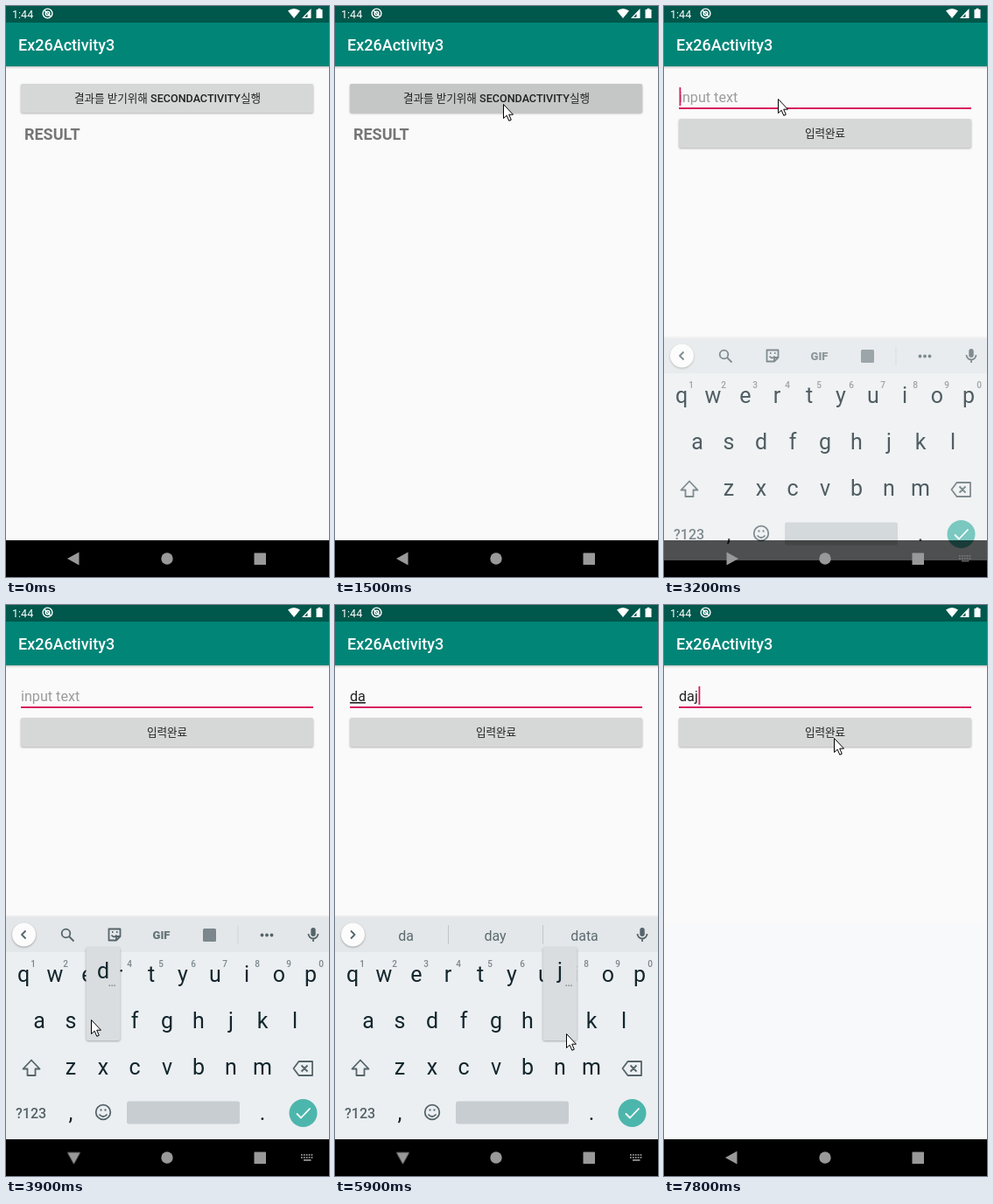
An HTML page that plays this animation: 369x653 px, repeating every 8 s.

```html
<!DOCTYPE html>
<html lang="ko">
<head>
<meta charset="utf-8">
<title>Ex26Activity3</title>
<style>
html, body { margin: 0; width: 100%; height: 100%; overflow: hidden; background: #000; }
svg { display: block; width: 369px; height: 653px; }
text { font-family: Roboto, "Noto Sans CJK KR", "Noto Sans CJK", sans-serif; }
.mid { text-anchor: middle; }
.title { font-size: 18px; font-weight: 500; fill: #fff; }
.label { font-size: 12.57px; font-weight: 500; fill: #222; text-anchor: middle; }
.ko { font-weight: 400; }
.result { font-size: 18px; font-weight: 700; fill: #757575; }
.field { font-size: 16.16px; fill: #222; }
.under { text-decoration: underline; text-decoration-thickness: 1px; }
.key { font-size: 25px; fill: #12262e; text-anchor: middle; }
.hint { font-size: 10px; font-weight: 500; fill: #7b878c; text-anchor: middle; }
.sug { font-size: 16px; fill: #5c6a70; text-anchor: middle; }
.line { fill: none; stroke: #55646b; stroke-width: 1.8; stroke-linejoin: round; }
.shade { filter: drop-shadow(0 1px 1px rgba(0,0,0,.3)); }

/* One loop is 8 s, so 100 ms is 1.25 %. */
.a { animation: 8s step-end -8ms infinite; }
.gone { opacity: 0; }

.pointer { animation-name: pointer; }
@keyframes pointer {
  0% { opacity: 0; transform: translate(349px, 170px); }
  2.5% { opacity: 1; transform: translate(349px, 170px); }
  3.75% { transform: translate(312px, 204px); }
  5% { transform: translate(268px, 206px); }
  6.25% { transform: translate(230px, 196px); }
  7.5% { transform: translate(208px, 165px); }
  8.75% { transform: translate(198px, 140px); }
  10% { transform: translate(194px, 122px); }
  11.25% { transform: translate(192px, 112px); }
  22.5% { transform: translate(190px, 122px); }
  23.75% { transform: translate(182px, 130px); }
  25% { transform: translate(167px, 132px); }
  26.25% { transform: translate(141px, 122px); }
  27.5% { transform: translate(136px, 115px); }
  28.75% { transform: translate(132px, 109px); }
  30% { transform: translate(130px, 106px); }
  41.25% { transform: translate(129px, 120px); }
  42.5% { transform: translate(125px, 190px); }
  43.75% { transform: translate(116px, 300px); }
  45% { transform: translate(106px, 395px); }
  46.25% { transform: translate(99px, 450px); }
  47.5% { transform: translate(97px, 474px); }
  53.75% { transform: translate(97px, 474px); animation-timing-function: steps(4); }
  58.75% { transform: translate(38px, 480px); }
  63.75% { transform: translate(38px, 480px); animation-timing-function: steps(6); }
  71.25% { transform: translate(264px, 490px); }
  75% { transform: translate(264px, 490px); animation-timing-function: steps(5); }
  81.25% { transform: translate(340px, 584px); }
  86.25% { transform: translate(340px, 584px); animation-timing-function: steps(4); }
  91.25% { transform: translate(234px, 240px); animation-timing-function: steps(3); }
  95%, 100% { opacity: 1; transform: translate(194px, 152px); }
}

.ripple { animation-name: ripple; }
@keyframes ripple {
  0% { fill: #d6d8d7; }
  16.25% { fill: #cecfce; }
  17.5%, 100% { fill: #c5c7c6; }
}

.second { animation-name: second; }
@keyframes second {
  0% { opacity: 0; transform: translateY(13px); }
  20% { opacity: .4; transform: translateY(13px); }
  21.25% { opacity: .8; transform: translateY(6px); }
  22.5% { opacity: 1; transform: translateY(2px); }
  23.75%, 100% { opacity: 1; transform: none; }
}

.focus { animation-name: focus; }
@keyframes focus { 0% { opacity: 0; } 37.5%, 100% { opacity: 1; } }

.caret { animation-name: caret; }
@keyframes caret {
  0% { opacity: 0; transform: none; }
  37.5% { opacity: 1; transform: none; }
  43.75% { opacity: 0; }
  50% { opacity: 1; transform: none; }
  53.75% { opacity: 1; transform: translateX(9px); }
  60% { opacity: 0; transform: translateX(9px); }
  63.75% { opacity: 1; transform: translateX(18px); }
  70% { opacity: 0; transform: translateX(18px); }
  75% { opacity: 1; transform: translateX(22px); }
  81.25% { opacity: 0; }
  87.5% { opacity: 1; }
  92.5% { opacity: 0; }
  97.5%, 100% { opacity: 1; transform: translateX(22px); }
}

.empty { animation-name: empty; }
@keyframes empty { 0% { opacity: 1; } 53.75%, 100% { opacity: 0; } }
.one { animation-name: one; }
@keyframes one { 53.75% { opacity: 1; } 63.75% { opacity: 0; } }
.two { animation-name: two; }
@keyframes two { 63.75% { opacity: 1; } 75% { opacity: 0; } }
.three { animation-name: three; }
@keyframes three { 75% { opacity: 1; } 86.25% { opacity: 0; } }
.done { animation-name: done; }
@keyframes done { 86.25%, 100% { opacity: 1; } }
.words { animation-name: words; }
@keyframes words { 53.75%, 100% { opacity: 1; } }
.last { animation-name: last; }
@keyframes last { 75%, 100% { opacity: 1; } }

.press1 { animation-name: press1; }
@keyframes press1 { 48.75% { opacity: 1; } 53.75% { opacity: 0; } }
.press2 { animation-name: press2; }
@keyframes press2 { 60% { opacity: 1; } 63.75% { opacity: 0; } }
.press3 { animation-name: press3; }
@keyframes press3 { 73.75% { opacity: 1; } 76.25% { opacity: 0; } }

.board { animation-name: board; }
@keyframes board {
  0% { opacity: 0; transform: translateY(50px); }
  38.75% { opacity: .3; transform: translateY(46px); }
  40% { opacity: .74; transform: translateY(23px); }
  41.25% { opacity: .95; transform: translateY(5px); }
  42.5% { opacity: 1; transform: none; }
  86.25% { opacity: .95; transform: translateY(4px); }
  87.5% { opacity: .7; transform: translateY(20px); }
  88.75% { opacity: .25; transform: translateY(44px); }
  90%, 100% { opacity: 0; transform: translateY(50px); }
}

.enter { animation-name: enter; }
@keyframes enter { 0% { fill: #4db6ac; } 85%, 100% { fill: #00a396; } }

.back { animation-name: back; transform-origin: 77.5px 632px; }
@keyframes back {
  0% { transform: none; }
  38.75% { transform: rotate(60deg); }
  40% { transform: rotate(180deg); }
  41.25% { transform: rotate(250deg); }
  42.5% { transform: rotate(270deg); }
  87.5% { transform: rotate(180deg); }
  88.75% { transform: rotate(40deg); }
  90%, 100% { transform: none; }
}
.ime { animation-name: ime; }
@keyframes ime {
  0% { opacity: 0; }
  38.75% { opacity: .2; }
  40% { opacity: .55; }
  41.25% { opacity: 1; }
  87.5% { opacity: .4; }
  88.75%, 100% { opacity: 0; }
}
</style>
</head>
<body>
<svg viewBox="0 0 369 653">
  <defs>
    <linearGradient id="drop" x2="0" y2="1">
      <stop stop-color="#000" stop-opacity=".2"/>
      <stop offset="1" stop-color="#000" stop-opacity="0"/>
    </linearGradient>
    <g id="bars">
      <rect width="369" height="611" fill="#fafafa"/>
      <rect y="69" width="369" height="3" fill="url(#drop)"/>
      <rect y="19" width="369" height="50" fill="#008577"/>
      <rect width="369" height="19" fill="#00574b"/>
      <text class="title" x="14" y="51">Ex26Activity3</text>
      <text x="7" y="13.5" font-size="12.57" fill="#fff">1:44</text>
      <g fill="none" stroke="#fff" stroke-width="1.4">
        <circle cx="47.5" cy="8.5" r="5.4"/>
        <circle cx="47.5" cy="8.5" r="2.4"/>
        <path d="M44 5l7 7"/>
      </g>
      <path fill="#fff" d="M322 5.5Q329 .5 336 5.5L329 14ZM338 14L348.500 3V14Z"/>
      <path fill="#00574b" d="M344.500 9V12.700H341Z"/>
      <path fill="#fff" d="M354.500 4H356.500V2.700H359.500V4H361.500V14H354.500Z"/>
    </g>
    <g id="pop">
      <rect class="shade" x="-19.500" y="391" width="39" height="107" rx="3" fill="#d9dddf"/>
      <text class="hint" x="10" y="436" style="font-size:13px">…</text>
    </g>
    <g id="mic">
      <rect x="348.300" y="369" width="5.400" height="10" rx="2.700" fill="#55646b"/>
      <path class="line" d="M345.500 376a5.500 5.500 0 0 0 11 0M351 381.500V385"/>
    </g>
  </defs>

  <use href="#bars"/>
  <rect class="shade a ripple" x="17" y="89" width="334" height="33" rx="2" fill="#d6d8d7"/>
  <text class="label" x="184.500" y="110"><tspan class="ko">결과를 받기위해</tspan> SECONDACTIVITY<tspan class="ko">실행</tspan></text>
  <text class="result" x="21" y="153">RESULT</text>
  <rect y="611" width="369" height="42"/>

  <g class="a second gone">
    <use href="#bars"/>
    <rect class="a done gone" y="365" width="369" height="246" fill="#f8f9fb"/>
    <rect x="17" y="116" width="334" height="1" fill="#808080"/>
    <rect class="a focus gone" x="17" y="116" width="334" height="2" fill="#d81b60"/>
    <text class="field a empty" x="17" y="110" style="fill:#9c9c9c">input text</text>
    <text class="field under a one gone" x="17" y="110">d</text>
    <text class="field under a two gone" x="17" y="110">da</text>
    <text class="field under a three gone" x="17" y="110">daj</text>
    <text class="field a done gone" x="17" y="110">daj</text>
    <rect class="a caret gone" x="17.500" y="93" width="1.800" height="21" fill="#d81b60"/>
    <rect class="shade" x="17" y="129" width="334" height="33" rx="2" fill="#d6d8d7"/>
    <text class="label ko" x="184" y="150">입력완료</text>
  </g>

  <g class="a board gone">
    <rect y="355" width="369" height="2" fill="#000" opacity=".05"/>
    <rect y="357" width="369" height="254" fill="#eceff1"/>
    <rect y="357" width="369" height="40" fill="#e3e7e9"/>
    <circle class="shade" cx="20.500" cy="377" r="13.500" fill="#fcfcfc"/>
    <use href="#mic"/>

    <g class="a empty">
      <path class="line" d="M22.500 372.500L18 377L22.500 381.500"/>
      <circle class="line" cx="68.500" cy="375.500" r="4.800"/>
      <path class="line" d="M72 379L77.500 384.500"/>
      <path class="line" d="M117.500 370.500H130.500V379L126 383.500H117.500ZM126 383V379H130M120.500 377.500q3 4 6 0M121 374h1.500M126 374h1.500"/>
      <text class="mid" x="177.500" y="382" font-size="13" font-weight="900" fill="#66747a">GIF</text>
      <rect x="225" y="370" width="15" height="15" rx="1.500" fill="#7b878c"/>
      <path stroke="#d0d5d8" d="M265 367V388"/>
      <g fill="#55646b"><circle cx="292.500" cy="377.500" r="1.900"/><circle cx="298" cy="377.500" r="1.900"/><circle cx="303.500" cy="377.500" r="1.900"/></g>
    </g>
    <g class="a words gone">
      <path class="line" d="M18 372.500L22.500 377L18 381.500"/>
      <path stroke="#bfc6ca" d="M129.500 366V388M237.500 366V388"/>
    </g>
    <g class="sug a one gone"><text x="81" y="383.500">d</text><text x="183" y="383.500">do</text><text x="285" y="383.500">did</text></g>
    <g class="sug a two gone"><text x="81" y="383.500">da</text><text x="183" y="383.500">day</text><text x="285" y="383.500">data</text></g>
    <g class="sug a last gone"><text x="81" y="383.500">daj</text><text x="183" y="383.500">Daj</text><text x="285" y="383.500">days</text></g>

    <text class="hint" y="413.500" x="31 68 104 141 177 214 250 287 323 360">1234567890</text>
    <text class="key" y="431" x="20 56 93 129 166 202 239 275 312 348">qwertyuiop</text>
    <text class="key" y="484" x="38 74 111 147 184 220 257 293 330">asdfghjkl</text>
    <text class="key" y="537" x="74 111 147 184 220 257 293">zxcvbnm</text>
    <path class="line" d="M29 520.500L38.500 530.500H33.500V538H24.500V530.500H19.500Z"/>
    <path class="line" d="M334.500 522H350V538H334.500L328.500 530ZM337.500 526.500L344.500 533.500M344.500 526.500L337.500 533.500"/>
    <text x="11" y="586.500" font-size="16" font-weight="500" fill="#55646b">?123</text>
    <text class="key" x="74 293" y="589">,.</text>
    <circle class="line" cx="111" cy="580" r="8.300"/>
    <path class="line" d="M106.500 582.500q4.500 5 9 0M107.500 577.500h2M112.500 577.500h2"/>
    <rect x="138" y="567.500" width="129" height="26" rx="2.500" fill="#c7cdd0"/>
    <circle class="a enter" cx="339.500" cy="581" r="16" fill="#4db6ac"/>
    <path class="line" d="M332 581.500L337 586.500L347.500 575.500" style="stroke:#fff"/>

    <g class="a press1 gone" ><use href="#pop" x="111"/><text class="key" x="111" y="427">d</text></g>
    <g class="a press2 gone"><use href="#pop" x="38"/><text class="key" x="38" y="427" style="fill:#46555c">a</text></g>
    <g class="a press3 gone"><use href="#pop" x="257"/><text class="key" x="257" y="427">j</text></g>
  </g>

  <rect y="611" width="369" height="42" opacity=".55"/>
  <g fill="#999">
    <path class="a back" d="M70 632L83.500 624.500V639.500Z"/>
    <circle cx="184" cy="632" r="6.700"/>
    <rect x="283.500" y="625.500" width="13.500" height="13.500" rx=".6"/>
    <g class="a ime gone">
      <path fill="none" stroke="#999" stroke-width="1.700" stroke-dasharray="1.700 1.200" d="M337 628.800H351.500M337 631.800H351.500"/>
      <path d="M340 634H348.500V635.700H340Z"/>
    </g>
  </g>

  <path class="a pointer gone" fill="#fff" stroke="#000" stroke-linejoin="round" d="M.5 .5V16.500L4.200 13.200L6.800 19.300L9.300 18.200L6.700 12.200H11.500Z"/>
</svg>
</body>
</html>
```
